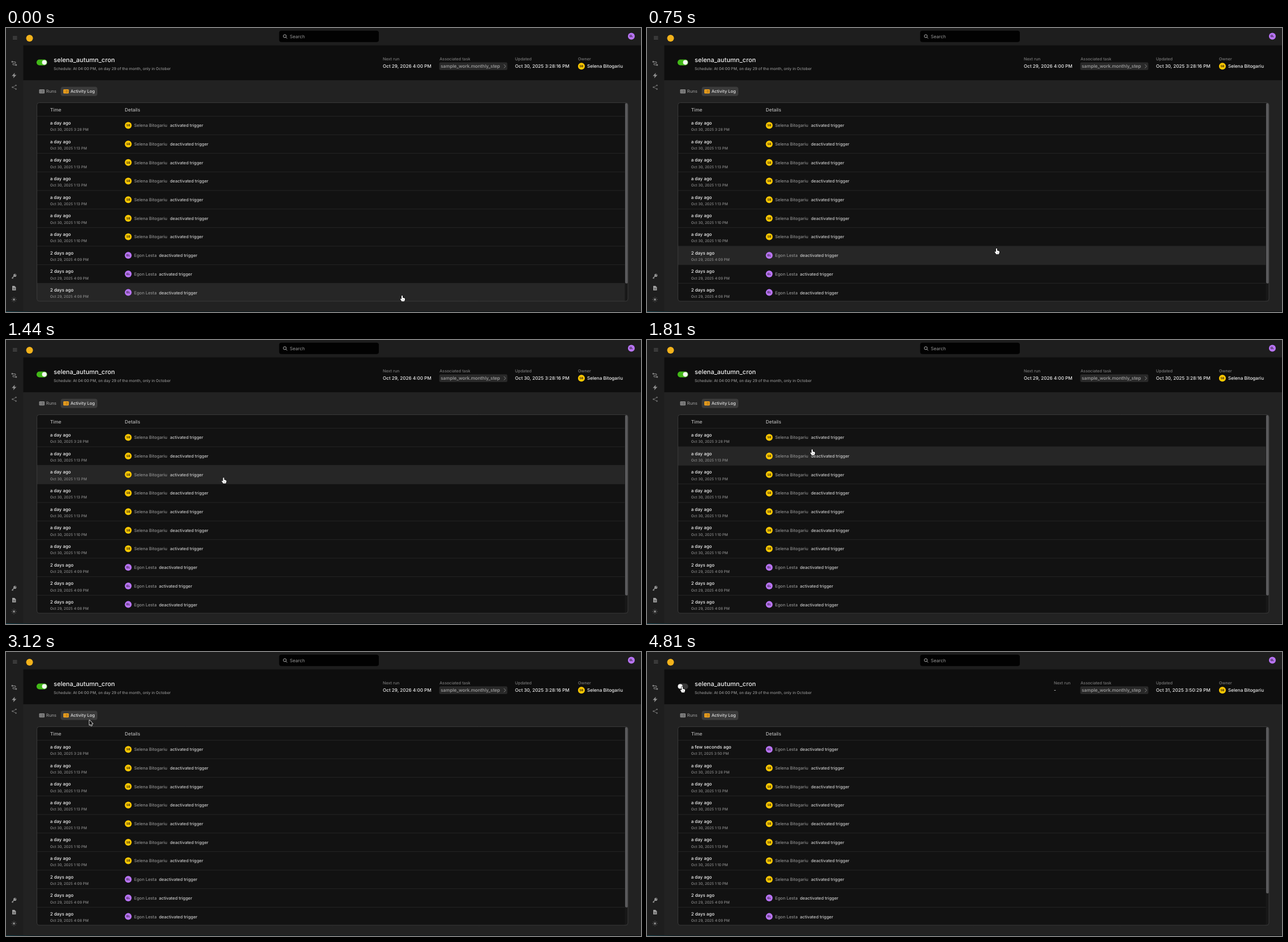
An HTML page with a canvas for the animation above (8000 ms loop, 1119 by 500 pixels).

```html
<!DOCTYPE html>
<html lang="en">
<head>
<meta charset="utf-8">
<title>Trigger activity log</title>
<style>
  html, body { margin: 0; width: 100%; height: 100%; overflow: hidden; background: #1e1e1e; }
  canvas { display: block; width: 1119px; height: 500px; }
</style>
</head>
<body>
<canvas id="stage"></canvas>
<script>
const W = 1119, H = 500, LOOP = 8000, STEP = 62.5;
const canvas = document.getElementById('stage');
const ctx = canvas.getContext('2d');
const dpr = window.devicePixelRatio || 1;
canvas.width = W * dpr;
canvas.height = H * dpr;

const TABLE = { x: 54.5, y: 131.5, w: 1041.5, h: 349.5 };
const ROW_TOP = 155.3, ROW_H = 32.68;
const TOGGLE_AT = 4680, UPDATE_AT = 4800;

const PEOPLE = {
  selena: { name: 'Selena Bitogariu', initials: 'SB', color: '#ffc900', actionX: 289 },
  egon: { name: 'Egon Lesta', initials: 'EL', color: '#b974f8', actionX: 269.5 }
};

const event = (who, age, date) => ({ who: PEOPLE[who], age, date });
const selenaEvent = time => event('selena', 'a day ago', `Oct 30, 2025 ${time} PM`);
const egonEvent = time => event('egon', '2 days ago', `Oct 29, 2025 ${time} PM`);
const before = [
  ...['3:28', '1:13', '1:13', '1:13', '1:13', '1:10', '1:10'].map(selenaEvent),
  ...['4:09', '4:09', '4:08'].map(egonEvent)
];
const after = [event('egon', 'a few seconds ago', 'Oct 31, 2025 3:50 PM'), ...before.slice(0, 9)];

// Pointer path: [time, x, y]
const PATH = [
  [0, 698, 471], [750, 616, 388], [1062.5, 499, 305], [1812.5, 291, 192.5],
  [2125, 244, 160], [2500, 244, 160], [3125, 147, 120], [4062.5, 62, 61], [LOOP, 62, 61]
];

const HAND = new Path2D('M-1 1Q-1 0 0 0Q1 0 1 1L1 4Q2.1 3.4 2.6 4.4Q3.6 3.9 4 4.9Q5 4.7 5 5.7' +
  'L5 7Q4.9 8.5 4.1 9.3L4.1 10.3L-1 10.3L-1.2 9.2L-3.2 6.6Q-3.6 5.2-2.4 5.4L-1 6.6Z');
const ARROW = new Path2D('M0 0L0 8.6L1.9 6.9L3.2 9.8L4.6 9.2L3.3 6.4L6 6.2Z');

const clamp = v => Math.min(1, Math.max(0, v));

function text(str, x, y, size, color, weight = 500, align = 'left') {
  ctx.font = `${weight} ${size}px Inter, "Liberation Sans", sans-serif`;
  ctx.textAlign = align;
  ctx.fillStyle = color;
  ctx.fillText(str, x, y + size * 0.36);
}

function rect(x, y, w, h, color) {
  ctx.fillStyle = color;
  ctx.fillRect(x, y, w, h);
}

function box(x, y, w, h, r, fill, stroke) {
  ctx.beginPath();
  ctx.roundRect(x, y, w, h, r);
  if (fill) { ctx.fillStyle = fill; ctx.fill(); }
  if (stroke) { ctx.strokeStyle = stroke; ctx.lineWidth = 1; ctx.stroke(); }
}

function disc(x, y, r, color) {
  ctx.beginPath();
  ctx.arc(x, y, r, 0, Math.PI * 2);
  ctx.fillStyle = color;
  ctx.fill();
}

function line(path, color, width = 1) {
  ctx.strokeStyle = color;
  ctx.lineWidth = width;
  ctx.stroke(new Path2D(path));
}

function avatar(person, x, y) {
  disc(x, y, 6, person.color);
  text(person.initials, x, y, 5.2, '#1c1712', 600, 'center');
}

// Cubic through the points; flat at rests and turning points.
function slope(i, k) {
  if (i === 0 || i === PATH.length - 1) return 0;
  const rate = j => (PATH[j + 1][k] - PATH[j][k]) / (PATH[j + 1][0] - PATH[j][0]);
  const a = rate(i - 1), b = rate(i);
  return a * b <= 0 ? 0 : 2 * a * b / (a + b);
}

function pointer(t) {
  let i = 0;
  while (i < PATH.length - 2 && t >= PATH[i + 1][0]) i++;
  const a = PATH[i], b = PATH[i + 1], d = b[0] - a[0];
  const u = (t - a[0]) / d, v = 1 - u;
  const at = k => a[k] * v * v * (1 + 2 * u) + b[k] * u * u * (3 - 2 * u) +
    d * u * v * (v * slope(i, k) - u * slope(i + 1, k));
  return { x: at(1), y: at(2) };
}

const inside = (p, x, y, w, h) => p.x >= x && p.x <= x + w && p.y >= y && p.y <= y + h;

function drawSidebar() {
  const c = '#858585';
  line('M12 15H19.5M12 17.3H19.5M12 19.6H19.5', '#6a6a6a', 0.8);
  line('M11 59.5H15.5Q17 59.5 17 61Q17 62.3 15.5 62.3H13.5Q12 62.3 12 63.8Q12 65 13.5 65H17', c, 1.1);
  disc(11, 59.5, 1.4, c);
  disc(17.8, 65, 1.5, c);
  ctx.fillStyle = '#929292';
  ctx.fill(new Path2D('M15.6 78.8L10.2 84.6H13.6L12.7 88.6L18.4 82.6H14.9Z'));
  line('M17.5 101L11.5 104.3L17.5 107.5', '#707070', 0.9);
  [[17.5, 101], [11.5, 104.3], [17.5, 107.5]].forEach(([x, y]) => disc(x, y, 1.3, '#707070'));
  disc(15.7, 435.4, 2.6, '#989898');
  disc(16.5, 434.6, 0.8, '#1e1e1e');
  line('M14.3 436.8L10.3 440.8M11.2 439.9L12.5 441.2', '#989898', 1.3);
  ctx.fillStyle = '#a0a0a0';
  ctx.fill(new Path2D('M11 454H15L17.4 456.4V462H11Z'));
  line('M12.6 458.2H15.8M12.6 460H15.8', '#1e1e1e', 0.7);
  disc(14, 478, 2.1, '#858585');
  for (let i = 0; i < 8; i++) {
    const a = i * Math.PI / 4, cx = Math.cos(a), sy = Math.sin(a);
    line(`M${14 + 3.2 * cx} ${478 + 3.2 * sy}L${14 + 4.6 * cx} ${478 + 4.6 * sy}`, '#757575', 0.9);
  }
}

function drawTopBar() {
  disc(41.5, 18, 6, '#f2b21b');
  box(481.3, 4.7, 175.7, 20, 4, '#020202');
  ctx.beginPath();
  ctx.arc(491.3, 14.3, 2.6, 0, Math.PI * 2);
  ctx.strokeStyle = '#b5b5b5';
  ctx.lineWidth = 1;
  ctx.stroke();
  line('M493.2 16.3L495.4 18.5', '#b5b5b5');
  text('Search', 500, 14.8, 8.1, '#969696', 400);
  avatar(PEOPLE.egon, 1102, 14.6);
}

function mix(a, b, k) {
  return `rgb(${a.map((v, i) => Math.round(v + (b[i] - v) * k)).join()})`;
}

function drawHeader(t, updated) {
  const off = clamp((t - TOGGLE_AT + 50) / 110);
  box(53.8, 55.5, 18.8, 10.2, 5.1, mix([66, 184, 24], [56, 56, 56], off));
  disc(67.6 - 9 * off, 60.6, 4.1, '#f8f8f8');

  text('selena_autumn_cron', 84, 56, 11, '#f0f0f0');
  text('Schedule: At 04:00 PM, on day 29 of the month, only in October', 84, 72, 6.75, '#909090', 550);

  const label = (str, x) => text(str, x, 54.6, 7.15, '#7a7a7a');
  const value = (str, x) => text(str, x, 67.3, 8.1, '#ededed');
  const nextX = updated ? 717 : 664;
  label('Next run', nextX);
  value(updated ? '-' : 'Oct 29, 2026 4:00 PM', nextX);
  label('Associated task', 764);
  box(763.5, 60.5, 120, 13.6, 2.5, '#292929');
  text('sample_work.monthly_step', 766, 67.3, 8.1, '#a2a2a2');
  line('M877.4 64.2L880.6 67.4L877.4 70.6', '#909090', 0.9);
  label('Updated', 897);
  value(updated ? 'Oct 31, 2025 3:50:29 PM' : 'Oct 30, 2025 3:28:16 PM', 897);
  label('Owner', 1008);
  avatar(PEOPLE.selena, 1014, 67.2);
  value(PEOPLE.selena.name, 1024);
}

function tabIcon(x, color) {
  box(x, 108, 9.6, 7.2, 1.3, color);
  line(`M${x + 1.6} 110.4H${x + 2.8}M${x + 4} 110.4H${x + 8}M${x + 1.6} 112.8H${x + 2.8}M${x + 4} 112.8H${x + 8}`,
    'rgba(30,30,30,.65)', 0.8);
}

function drawTabs() {
  tabIcon(58.4, '#858585');
  text('Runs', 70.8, 111.7, 7.6, '#909090');
  box(96.5, 103.5, 64.5, 16.2, 4, '#3b3b3b');
  tabIcon(101, '#f6a51c');
  text('Activity Log', 113.7, 111.7, 7.5, '#e4e4e4');
}

function drawTable(p, updated) {
  const { x, y, w, h } = TABLE;
  ctx.save();
  box(x, y, w, h, 4, '#121212');
  ctx.clip();
  text('Time', 77.7, 143.6, 8.3, '#b4b4b4');
  text('Details', 209.3, 143.6, 8.3, '#b4b4b4');

  (updated ? after : before).forEach((row, i) => {
    const top = ROW_TOP + i * ROW_H, mid = top + 16.4;
    if (inside(p, x, top, 1036.5, ROW_H)) rect(x, top, w, ROW_H, '#262626');
    rect(x, top - 0.5, w, 1, '#252525');
    text(row.age, 77.7, top + 11.8, 7.9, '#f0f0f0');
    text(row.date, 77.7, top + 23.6, 6.45, '#8a8a8a', 450);
    avatar(row.who, 215.4, mid - 0.2);
    text(row.who.name, 225.7, mid, 7.5, '#8f8f8f');
    const activated = (i % 2 === 0) !== updated;
    text(activated ? 'activated trigger' : 'deactivated trigger', row.who.actionX, mid, 7.45, '#cacaca');
  });

  rect(1090.5, y, 5.5, h, '#181818');
  box(1091, 132, 5, updated ? 293 : 317.8, 2.5, '#5a5a5c');
  ctx.restore();
  box(x, y, w, h, 4, null, '#393939');
}

function drawPointer(p) {
  const hand = inside(p, 53, 54.5, 20, 12) || inside(p, 96.5, 103.5, 64.5, 16) ||
    inside(p, TABLE.x, ROW_TOP, 1036, 330);
  ctx.save();
  ctx.translate(p.x, p.y);
  ctx.lineJoin = 'round';
  ctx.lineWidth = hand ? 1.3 : 1.6;
  ctx.strokeStyle = hand ? '#111' : '#e8e8e8';
  ctx.fillStyle = hand ? '#fff' : '#0a0a0a';
  const shape = hand ? HAND : ARROW;
  ctx.stroke(shape);
  ctx.fill(shape);
  if (hand) line('M1.1 6.9V8.6M2.6 6.9V8.6', '#555', 0.5);
  ctx.restore();
}

function drawBottomEdge() {
  const edge = ctx.createLinearGradient(0, 0, W, 0);
  edge.addColorStop(0, '#0f4552');
  edge.addColorStop(0.04, '#0c1d22');
  edge.addColorStop(1, '#0c1012');
  rect(0, 499, W, 1, edge);
}

function draw(t) {
  const updated = t >= UPDATE_AT;
  const p = pointer(t);
  ctx.setTransform(dpr, 0, 0, dpr, 0, 0);
  ctx.textRendering = 'geometricPrecision';
  rect(0, 0, W, H, '#1e1e1e');
  rect(30.5, 92, W, H, '#222222');
  rect(30.5, 30.5, W, 61.5, '#0e0e0e');
  drawBottomEdge();
  drawSidebar();
  drawTopBar();
  drawHeader(t, updated);
  drawTabs();
  drawTable(p, updated);
  drawPointer(p);
}

const start = performance.now();
function tick() {
  const t = (performance.now() - start) % LOOP;
  // Sixteen steps a second, each shown from its time rounded down to 10 ms.
  draw(Math.floor((t + 8) / STEP) * STEP % LOOP);
  requestAnimationFrame(tick);
}
tick();
</script>
</body>
</html>
```
